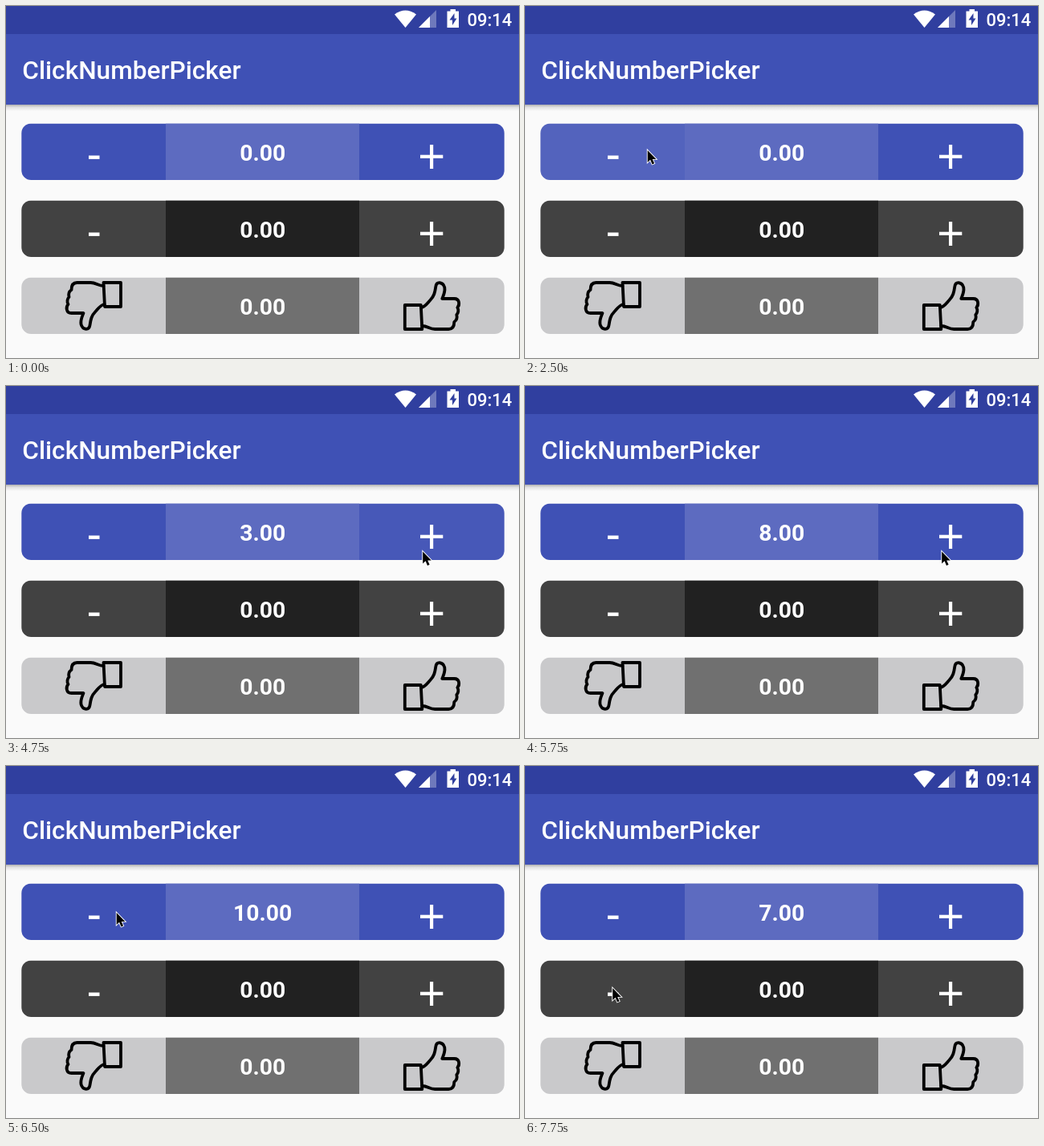
An HTML page with a canvas that plays this animation: 639x439 px, repeating every 8000 ms.

```html
<!DOCTYPE html>
<html lang="en">
<head>
<meta charset="utf-8">
<title>Number picker</title>
<style>
  html, body { margin: 0; width: 100%; height: 100%; overflow: hidden; background: #fafafa; }
  canvas { display: block; }
</style>
</head>
<body>
<canvas id="stage" width="639" height="439"></canvas>
<script>
const ctx = document.getElementById('stage').getContext('2d');
const LOOP = 8000, TICK = 250;
const PRIMARY = '#3f51b5', STATUS = '#303f9f';

// Each cue changes part of the state from the given tick on.
const cues = [
  { at: 0, pos: null, value: 0, minus: 0, plus: 0 },
  { at: 1, pos: [478, 97] },
  { at: 3, pos: [428, 112] },
  { at: 4, pos: [240, 165] },
  { at: 5, pos: [152, 179] },
  { at: 10, minus: .1 },
  { at: 11, minus: 0 },
  { at: 12, minus: .1 },
  { at: 13, minus: 0, pos: [340, 206] },
  { at: 14, pos: [518.5, 224] },
  { at: 15, pos: [518.5, 205.5] },
  { at: 16, value: 1, plus: .1 },
  { at: 17, value: 2, plus: .04 },
  { at: 18, value: 3, plus: .1 },
  { at: 19, plus: .04 },
  { at: 20, value: 4, plus: .1 },
  { at: 21, value: 5, plus: .04 },
  { at: 22, value: 7, plus: .1 },
  { at: 23, value: 8, plus: 0 },
  { at: 24, value: 10, plus: .04 },
  { at: 25, plus: 0, pos: [400, 208] },
  { at: 26, pos: [137, 182] },
  { at: 27, value: 9, minus: .1 },
  { at: 28, value: 8, minus: .04 },
  { at: 29, value: 7, minus: .1 },
  { at: 30, minus: 0, pos: [124, 230] },
  { at: 31, pos: [108.5, 276] }
];

function stateAt(ms) {
  const tick = Math.floor((ms % LOOP) / TICK);
  return Object.assign({}, ...cues.filter(cue => cue.at <= tick));
}

function rect(color, x, y, w, h) {
  ctx.fillStyle = color;
  ctx.fillRect(x, y, w, h);
}

function text(str, x, y, font, align = 'left') {
  ctx.font = font + ' Roboto, sans-serif';
  ctx.textAlign = align;
  ctx.fillStyle = '#fff';
  ctx.fillText(str, x, y);
}

function shape(path, color) {
  ctx.fillStyle = color;
  ctx.fill(new Path2D(path));
}

function drawBars() {
  rect('#fafafa', 0, 0, 639, 439);
  const shadow = ctx.createLinearGradient(0, 123, 0, 131);
  shadow.addColorStop(0, 'rgba(0,0,0,.3)');
  shadow.addColorStop(.4, 'rgba(0,0,0,.1)');
  shadow.addColorStop(1, 'rgba(0,0,0,0)');
  rect(shadow, 0, 123, 639, 8);
  rect(PRIMARY, 0, 35, 639, 88);
  rect(STATUS, 0, 0, 639, 35);
  text('ClickNumberPicker', 20.3, 91, '500 31.6px');

  shape('M484 10.5Q497.5 .5 511 10.5L497.5 27Z', '#fff');
  shape('M514 27H536V5Z', 'rgba(255,255,255,.3)');
  shape('M514 27H528V13Z', '#fff');
  shape('M550 6.5H553.5V4H560V6.5H564V27H549.5V6.5Z', '#fff');
  shape('M558.5 9L552.5 17.5H556V24L561.5 15.5H558.5Z', STATUS);
  text('09:14', 574.5, 24.8, '500 22px');
}

function drawThumb(x, y, turn) {
  ctx.save();
  ctx.translate(x, y);
  ctx.rotate(turn);
  ctx.strokeStyle = '#000';
  ctx.lineWidth = 3.8;
  ctx.lineJoin = ctx.lineCap = 'round';
  ctx.stroke(new Path2D('M-33.5 -1H-13.5L-12 29H-33.5Z'));
  ctx.stroke(new Path2D(
    'M-13 2C-8 1 -5 -4 -2 -7C3 -12 4 -17 5 -24C6 -31 14 -30 16 -23' +
    'C17 -17 14 -12 13 -9H28C35 -9 35 -1 32 2C34 5 33 9 31 11' +
    'C32 15 31 18 28 20C28 25 26 29 21 29H4C-3 29 -5 25 -12 25'));
  ctx.restore();
}

function drawSigns(y) {
  rect('#fff', 103, y + 40, 13.5, 4.4);
  rect('#fff', 516, y + 39.2, 28.3, 4.2);
  rect('#fff', 528, y + 26.5, 4.2, 30);
}

function drawPicker(y, side, middle, value, minus = 0, plus = 0) {
  ctx.save();
  ctx.beginPath();
  ctx.roundRect(19.3, y, 601.4, 70.5, 12);
  ctx.clip();
  rect(side, 19, y, 602, 71);
  rect(`rgba(255,255,255,${minus})`, 19, y, 180, 71);
  rect(`rgba(255,255,255,${plus})`, 440, y, 181, 71);
  rect(middle, 199, y, 241, 71);
  ctx.restore();
  text(value.toFixed(2), 319.7, y + 46.4, '700 28.3px', 'center');
}

function drawPointer([x, y]) {
  ctx.save();
  ctx.translate(x + .7, y + 1);
  const arrow = new Path2D('M0 0V15L3.4 11.8L5.8 17.4L8.4 16.3L6 10.9H10.6Z');
  ctx.strokeStyle = '#fff';
  ctx.lineWidth = 1.8;
  ctx.stroke(arrow);
  ctx.fillStyle = '#000';
  ctx.fill(arrow);
  ctx.restore();
}

function draw(now) {
  const { pos, value, minus, plus } = stateAt(now);
  drawBars();
  drawPicker(146.5, PRIMARY, '#5d6bc0', value, minus, plus);
  drawSigns(146.5);
  drawPicker(242.5, '#424242', '#212121', 0);
  drawSigns(242.5);
  drawPicker(338.5, '#c9c9cb', '#707070', 0);
  drawThumb(109.5, 374, Math.PI);
  drawThumb(530.3, 374, 0);
  if (pos) drawPointer(pos);
}

const start = performance.now();
function frame() {
  draw(performance.now() - start);
  requestAnimationFrame(frame);
}
frame();
</script>
</body>
</html>
```
